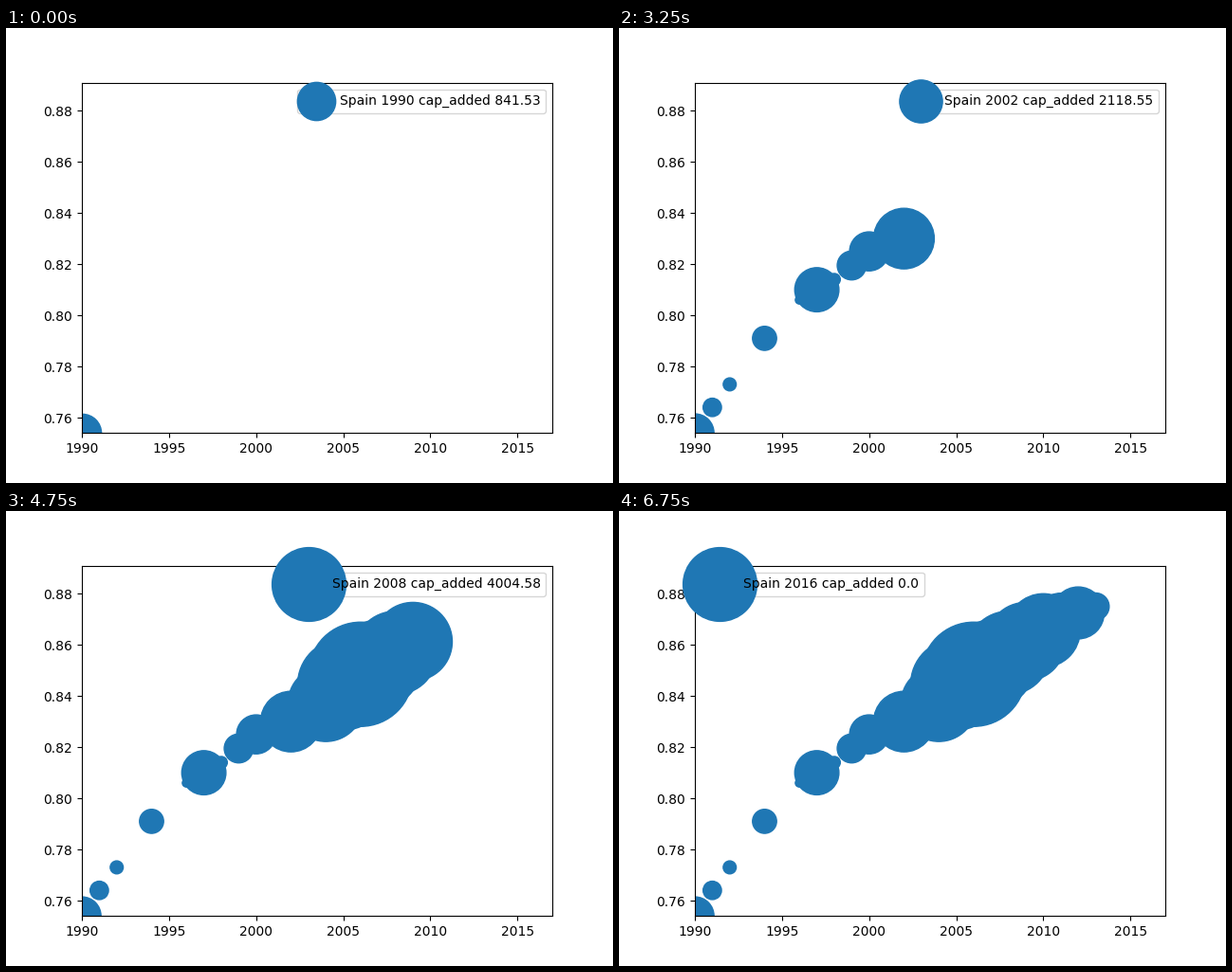
A matplotlib script that plays this animation: 640x480 px, repeating every 7 s.

```python
import matplotlib.pyplot as plt
import numpy as np
from matplotlib.animation import FuncAnimation

FIRST, LAST = 1990, 2017
INTERVAL = 250

# Turning points of the development index; years between are interpolated
INDEX = {
    1990: 0.754, 1991: 0.764, 1994: 0.791, 1996: 0.806, 1998: 0.814,
    2000: 0.825, 2002: 0.830, 2004: 0.837, 2005: 0.8445, 2007: 0.8525,
    2011: 0.870, 2013: 0.875, 2014: 0.880, 2017: 0.891,
}

# Turning points of the capacity added, which is also the marker area
ADDED = {
    1990: 841.53, 1991: 195.0, 1994: 334.96999999999997, 1996: 38.5,
    1997: 1125.27, 1998: 84.6, 2000: 880.4, 2002: 2118.55,
    2004: 3300.1200000000003, 2006: 6275.930000000002, 2007: 4445.58,
    2010: 3122.5800000000004, 2011: 1575.4, 2012: 1556.3, 2013: 424.2,
}
IDLE = (1993, 1995, 2001, 2003, 2014)  # nothing built; none after the last


def series(keys):
    knots = sorted(keys)
    return np.interp(years, knots, [keys[k] for k in knots])


years = np.arange(FIRST, LAST + 1)
index = series(INDEX)
added = series({**ADDED, **dict.fromkeys(IDLE, 0.0)})
points = np.column_stack([years, index])

fig, ax = plt.subplots(figsize=(6.4, 4.8), dpi=100)
ax.set_xlim(FIRST, LAST)
ax.set_ylim(index[0], index[-1])
bubbles = ax.scatter(years[:1], index[:1], s=added[:1], color="#1f77b4")


def init():
    return []


def update(i):
    bubbles.set_offsets(points[:i + 1])
    bubbles.set_sizes(added[:i + 1])
    # The caption runs one year behind the newest bubble
    k = max(i - 1, 0)
    bubbles.set_label(f"Spain {years[k]} cap_added {added[k]}")
    ax.legend(loc="best")
    return []


anim = FuncAnimation(fig, update, frames=len(years), init_func=init,
                     interval=INTERVAL, repeat=True, repeat_delay=0)
plt.show()
```
